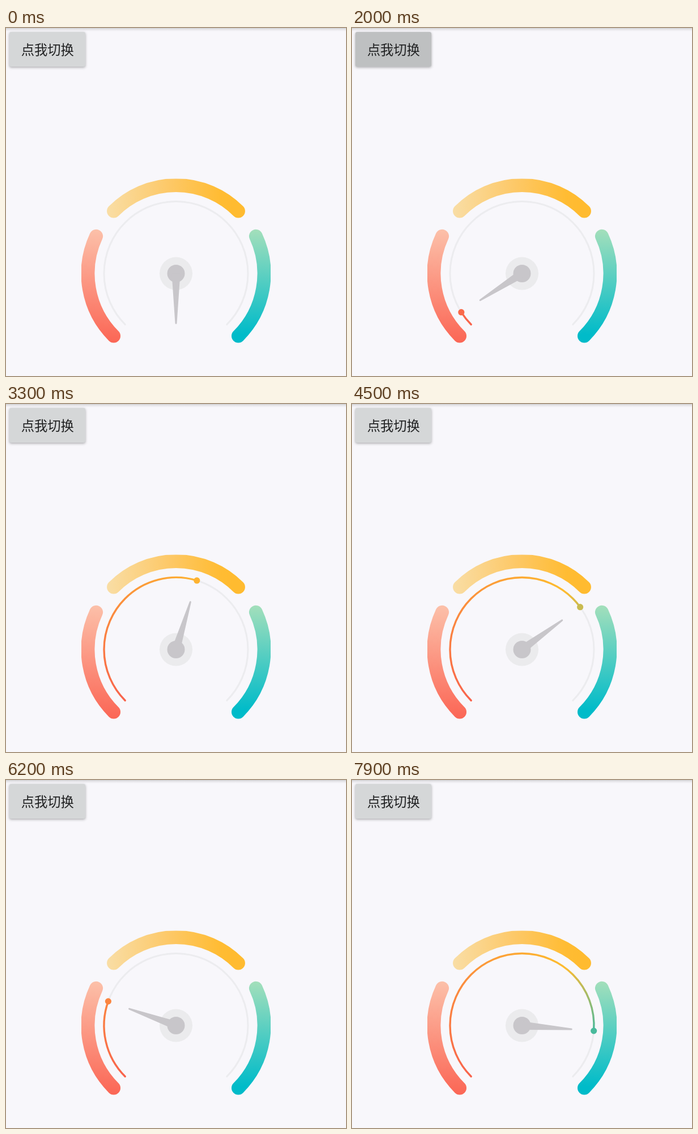
Write an HTML page with a canvas that moves like this. It is 600 px wide and 613 px high and loops after 8 s.

```html
<!DOCTYPE html>
<html lang="zh">
<head>
<meta charset="utf-8">
<title>Gauge</title>
<style>
  html, body { margin: 0; width: 600px; height: 613px; overflow: hidden; background: #f8f7fb; }
  canvas, svg { position: absolute; left: 0; top: 0; display: block; }
  text { font: 500 23.3px "Noto Sans CJK SC", "Noto Sans CJK", "Noto Sans", sans-serif; fill: #202122; }
</style>
</head>
<body>
<canvas id="stage" width="600" height="613"></canvas>
<svg width="600" height="613">
  <text x="26.7" y="47">点我切换</text>
  <circle id="touch" r="18" fill="#fff" fill-opacity=".3" stroke="#e4eaea" stroke-opacity=".75" stroke-width="2"/>
</svg>
<script>
const LOOP = 8000, STEP = 100, SWEEP_TIME = 2900;
const CX = 300, CY = 432.5;
const ctx = document.getElementById('stage').getContext('2d');
const touch = document.getElementById('touch');

const taps = [
  { x: 105, y: 25, touchAt: 1300, touchEnd: 1700, rippleAt: 1500, sweepAt: 1528, sweep: 188.9 },
  { x: 100, y: 35, touchAt: 5200, touchEnd: 5600, rippleAt: 5200, sweepAt: 5288, sweep: 231.5 }
];

// [angle in degrees, rgb] along the dial
const dialColors = [
  [135, [249, 99, 76]],
  [300, [254, 186, 46]],
  [307, [254, 187, 48]],
  [383, [14, 186, 192]]
];

const rad = deg => deg * Math.PI / 180;
const clamp = v => Math.max(0, Math.min(1, v));
const rgb = c => `rgb(${c.map(Math.round).join()})`;

// cubic-bezier(.4, 0, .4, 1)
function ease(x) {
  let lo = 0, hi = 1;
  for (let i = 0; i < 30; i++) {
    const m = (lo + hi) / 2;
    if (1.2 * m * (1 - m) + m ** 3 < x) lo = m; else hi = m;
  }
  return 3 * lo * lo - 2 * lo ** 3;
}

function dialColor(angle) {
  const last = dialColors[dialColors.length - 1];
  for (let i = 1; i < dialColors.length; i++) {
    const [a, from] = dialColors[i - 1], [b, to] = dialColors[i];
    if (angle <= b) return rgb(from.map((v, k) => v + (to[k] - v) * clamp((angle - a) / (b - a))));
  }
  return rgb(last[1]);
}

function linear(x0, y0, x1, y1, stops) {
  const g = ctx.createLinearGradient(x0, y0, x1, y1);
  stops.forEach(([at, color]) => g.addColorStop(at, color));
  return g;
}

const dialPaint = ctx.createConicGradient(rad(90), CX, CY);
dialColors.forEach(([a, c]) => dialPaint.addColorStop((a - 90) / 360, rgb(c)));

const bands = [
  [135, 205, linear(0, 355, 0, 550, [[0, '#fcc0a9'], [1, '#fb6857']])],
  [225, 315, linear(180, 0, 400, 0, [[0, '#f9dda4'], [.5, '#fdc866'], [.9, '#ffbc33'], [1, '#ffbb30']])],
  [335, 405, linear(0, 355, 0, 540, [[0, '#a3dfbb'], [1, '#00bbc9']])]
];
const topShadow = linear(0, 0, 0, 6, [[0, '#cfcfd2'], [.4, '#e6e5e9'], [1, '#f8f7fb']]);

function arc(r, from, to, width, paint) {
  ctx.beginPath();
  ctx.arc(CX, CY, r, rad(from), rad(to));
  ctx.lineWidth = width;
  ctx.lineCap = 'round';
  ctx.strokeStyle = paint;
  ctx.stroke();
}

function disc(x, y, r, fill) {
  ctx.beginPath();
  ctx.arc(x, y, r, 0, 2 * Math.PI);
  ctx.fillStyle = fill;
  ctx.fill();
}

function drawButton(t) {
  const box = new Path2D();
  box.roundRect(6, 7, 134, 61, 3);
  ctx.save();
  ctx.shadowColor = 'rgba(0,0,0,.32)';
  ctx.shadowBlur = 4;
  ctx.shadowOffsetY = 1.5;
  ctx.fillStyle = '#d5d7d8';
  ctx.fill(box);
  ctx.restore();

  ctx.save();
  ctx.clip(box);
  for (const tap of taps) {
    const age = t - tap.rippleAt;
    if (age < 0 || age >= 800) continue;
    const fade = 1 - clamp((age - 550) / 250);
    ctx.fillStyle = `rgba(0,0,0,${.065 * fade * clamp((age + 60) / 250)})`;
    ctx.fill(box);
    disc(tap.x, tap.y, age * .24, `rgba(0,0,0,${.045 * fade})`);
  }
  ctx.restore();
}

function drawNeedle(angle) {
  ctx.save();
  ctx.translate(CX, CY);
  ctx.rotate(rad(angle));
  ctx.beginPath();
  ctx.moveTo(0, -7.5);
  ctx.lineTo(87.5, -1.5);
  ctx.arc(87.5, 0, 1.5, rad(-90), rad(90));
  ctx.lineTo(0, 7.5);
  ctx.fillStyle = '#c8c6ca';
  ctx.fill();
  ctx.restore();
}

function drawGauge(t) {
  ctx.save();
  ctx.beginPath();
  ctx.rect(133, 265.5, 334, 300);
  ctx.clip();
  bands.forEach(([from, to, paint]) => arc(155.5, from, to, 24, paint));
  ctx.restore();
  arc(127, 135, 405, 3, '#ececef');

  const tap = taps.filter(p => t >= p.sweepAt).pop();
  let angle = 90;
  if (tap) {
    angle = 135 + tap.sweep * ease(clamp((t - tap.sweepAt) / SWEEP_TIME));
    arc(127, 135, angle, 3.4, dialPaint);
    disc(CX + 127 * Math.cos(rad(angle)), CY + 127 * Math.sin(rad(angle)), 5.6, dialColor(angle));
  }
  disc(CX, CY, 29, '#ebebed');
  disc(CX, CY, 15.5, '#c8c6ca');
  drawNeedle(angle);
}

function drawTouch(t) {
  const tap = taps.find(p => t >= p.touchAt && t < p.touchEnd);
  touch.style.display = tap ? '' : 'none';
  if (!tap) return;
  touch.setAttribute('cx', tap.x);
  touch.setAttribute('cy', tap.y);
}

const start = performance.now();
function frame() {
  const now = Math.max(0, performance.now() - start) % LOOP;
  const t = Math.floor(now / STEP) * STEP;
  ctx.fillStyle = '#f8f7fb';
  ctx.fillRect(0, 0, 600, 613);
  ctx.fillStyle = topShadow;
  ctx.fillRect(0, 0, 600, 6);
  drawButton(t);
  drawGauge(t);
  drawTouch(t);
  requestAnimationFrame(frame);
}
frame();
</script>
</body>
</html>
```
